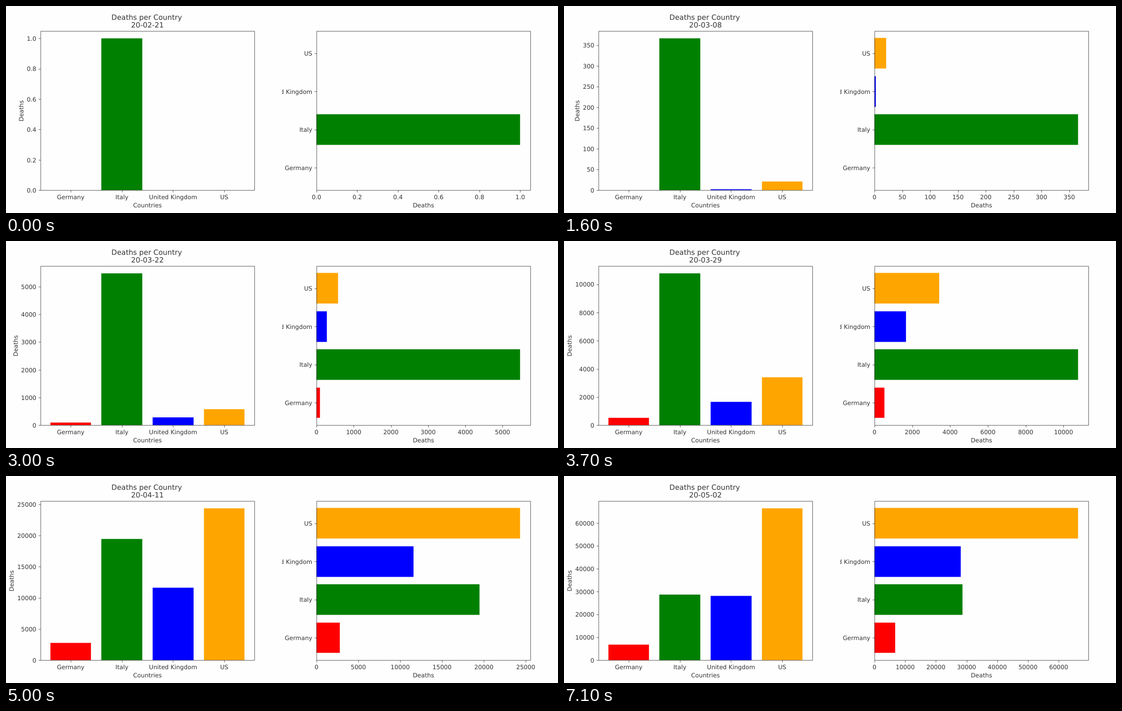
An HTML page for the animation above (10 s loop, 1080 by 405 pixels).

```html
<!DOCTYPE html>
<html lang="en">
<head>
<meta charset="utf-8">
<title>Deaths per Country</title>
<style>
  html, body { margin: 0; width: 100%; height: 100%; overflow: hidden; background: #fefefe; }
  svg { display: block; width: 100%; height: 100%; }
  text { font-family: "DejaVu Sans", sans-serif; font-size: 13.889px; fill: #333; text-rendering: geometricPrecision; }
  .title { font-size: 16.667px; }
  .line { fill: none; stroke: #000; stroke-opacity: .75; stroke-width: 1; }
</style>
</head>
<body>
<svg viewBox="0 0 1280 480">
  <clipPath id="half"><rect x="640" width="640" height="480"/></clipPath>
  <g id="columns"></g>
  <g id="rows" clip-path="url(#half)"></g>
</svg>
<script>
const LOOP = 10000, STEP = 100, LAST_DAY = 71;
const AREA = { left: 80, right: 576, top: 57.6, bottom: 427.2 };
const WIDTH = AREA.right - AREA.left, HEIGHT = AREA.bottom - AREA.top;
const MID_X = (AREA.left + AREA.right) / 2, MID_Y = (AREA.top + AREA.bottom) / 2;
const TICK = 4.86, PAD = 9.72, DIGIT = 8.837, DOT = 4.415;

// Key points are [day, deaths].
const countries = [
  { name: 'Germany', color: '#ff0000',
    keys: [[17, 2], [23, 11], [30, 94], [37, 533], [50, 2767], [59, 4862], [71, 6812]] },
  { name: 'Italy', color: '#008000',
    keys: [[0, 1], [4, 10], [8, 29], [16, 366], [22, 1441], [30, 5476], [37, 10779], [50, 19468], [59, 24114], [71, 28710]] },
  { name: 'United Kingdom', color: '#0000ff',
    keys: [[14, 1], [16, 2], [24, 55], [30, 281], [37, 1669], [50, 11599], [59, 19051], [71, 28131]] },
  { name: 'US', color: '#ffa500',
    keys: [[8, 1], [12, 11], [16, 21], [23, 58], [30, 585], [37, 3415], [50, 24342], [59, 42687], [71, 66369]] }
];

const growth = (a, b) => Math.log(b[1] / a[1]) / (b[0] - a[0]);

function slopeAt(keys, i) {
  const [before, key, after] = [keys[i - 1], keys[i], keys[i + 1]];
  if (!before) return growth(key, after);
  if (!after) return growth(before, key);
  const gapBefore = key[0] - before[0], gapAfter = after[0] - key[0];
  return (growth(before, key) * gapAfter + growth(key, after) * gapBefore) / (gapBefore + gapAfter);
}

// A smooth cubic through the logarithms of the key values.
function deathsOn(keys, day) {
  if (day < keys[0][0]) return 0;
  const next = Math.max(1, keys.findIndex(k => k[0] >= day));
  const [d0, v0] = keys[next - 1], [d1, v1] = keys[next];
  const gap = d1 - d0, t = (day - d0) / gap, u = 1 - t;
  const log = Math.log(v0) * u * u * (1 + 2 * t) + Math.log(v1) * t * t * (1 + 2 * u)
    + gap * t * u * (u * slopeAt(keys, next - 1) - t * slopeAt(keys, next));
  return Math.round(Math.exp(log));
}

function ticksUpTo(limit) {
  const raw = limit / 9, power = 10 ** Math.floor(Math.log10(raw));
  const step = [1, 2, 2.5, 5, 10].find(s => s * power >= raw) * power;
  const decimals = (String(step).split('.')[1] || '').length;
  const ticks = [];
  for (let i = 0; i * step <= limit; i++) ticks.push({ value: i * step, label: (i * step).toFixed(decimals) });
  return ticks;
}

const snap = v => Math.round(v) + 0.5;
const line = d => `<path class="line" d="${d}"/>`;
const xTick = x => line(`M${snap(x)} ${snap(AREA.bottom)}v${TICK}`);
const yTick = (x, y) => line(`M${snap(x)} ${snap(y)}h${-TICK}`);
const text = (x, y, s, anchor = 'middle', extra = '') =>
  `<text x="${x}" y="${y}" text-anchor="${anchor}" ${extra}>${s}</text>`;
const xLabel = (x, s) => text(x, 448, s);
const yLabel = (x, y, s) => text(x - PAD, y + 5.4, s, 'end');
const frame = dx =>
  line(`M${snap(AREA.left + dx)} ${snap(AREA.top)}H${snap(AREA.right + dx)}V${snap(AREA.bottom)}H${snap(AREA.left + dx)}Z`);

function bar(x0, y0, x1, y1, color) {
  const [a, b, c, d] = [x0, y0, x1, y1].map(Math.round);
  return `<rect x="${a}" y="${b}" width="${c - a}" height="${d - b}" fill="${color}"/>`;
}

function drawColumns(values, limit, ticks, date) {
  const unit = WIDTH / 4.18, yOf = v => AREA.bottom - v / limit * HEIGHT;
  let bars = '', marks = '';
  countries.forEach((c, i) => {
    const x = AREA.left + (i + 0.59) * unit;
    if (values[i]) bars += bar(x - 0.4 * unit, yOf(values[i]), x + 0.4 * unit, AREA.bottom, c.color);
    marks += xTick(x) + xLabel(x, c.name);
  });
  for (const t of ticks) marks += yTick(AREA.left, yOf(t.value)) + yLabel(AREA.left, yOf(t.value), t.label);
  const widest = Math.max(...ticks.map(t =>
    t.label.includes('.') ? (t.label.length - 1) * DIGIT + DOT : t.label.length * DIGIT));
  const labelX = AREA.left - PAD - widest - 8.1;
  return bars + frame(0) + marks +
    text(MID_X, 467.2, 'Countries') +
    text(0, 0, 'Deaths', 'middle', `transform="translate(${labelX} ${MID_Y + 0.7}) rotate(-90)"`) +
    text(MID_X - 1.7, 32.3, 'Deaths per Country', 'middle', 'class="title"') +
    text(MID_X, 49.5, date, 'middle', 'class="title"');
}

function drawRows(values, limit, ticks) {
  const left = AREA.left + 640, unit = HEIGHT / 4.18, xOf = v => left + v / limit * WIDTH;
  let bars = '', marks = '';
  countries.forEach((c, i) => {
    const y = AREA.bottom - (i + 0.59) * unit;
    if (values[i]) bars += bar(left, y - 0.4 * unit, xOf(values[i]), y + 0.4 * unit, c.color);
    marks += yTick(left, y) + yLabel(left, y, c.name);
  });
  for (const t of ticks) marks += xTick(xOf(t.value)) + xLabel(xOf(t.value), t.label);
  return bars + frame(640) + marks + text(MID_X + 640, 467.2, 'Deaths');
}

const columns = document.getElementById('columns'), rows = document.getElementById('rows');
let shown = -1;

function showDay(day) {
  if (day === shown) return;
  shown = day;
  const values = countries.map(c => deathsOn(c.keys, day));
  const limit = Math.max(...values) * 1.05, ticks = ticksUpTo(limit);
  const date = new Date(Date.UTC(2020, 1, 21 + day)).toISOString().slice(2, 10);
  columns.innerHTML = drawColumns(values, limit, ticks, date);
  rows.innerHTML = drawRows(values, limit, ticks);
}

const start = performance.now();
function tick() {
  const time = (performance.now() - start) % LOOP;
  showDay(Math.min(LAST_DAY, Math.floor(time / STEP)));
  requestAnimationFrame(tick);
}
tick();
</script>
</body>
</html>
```
